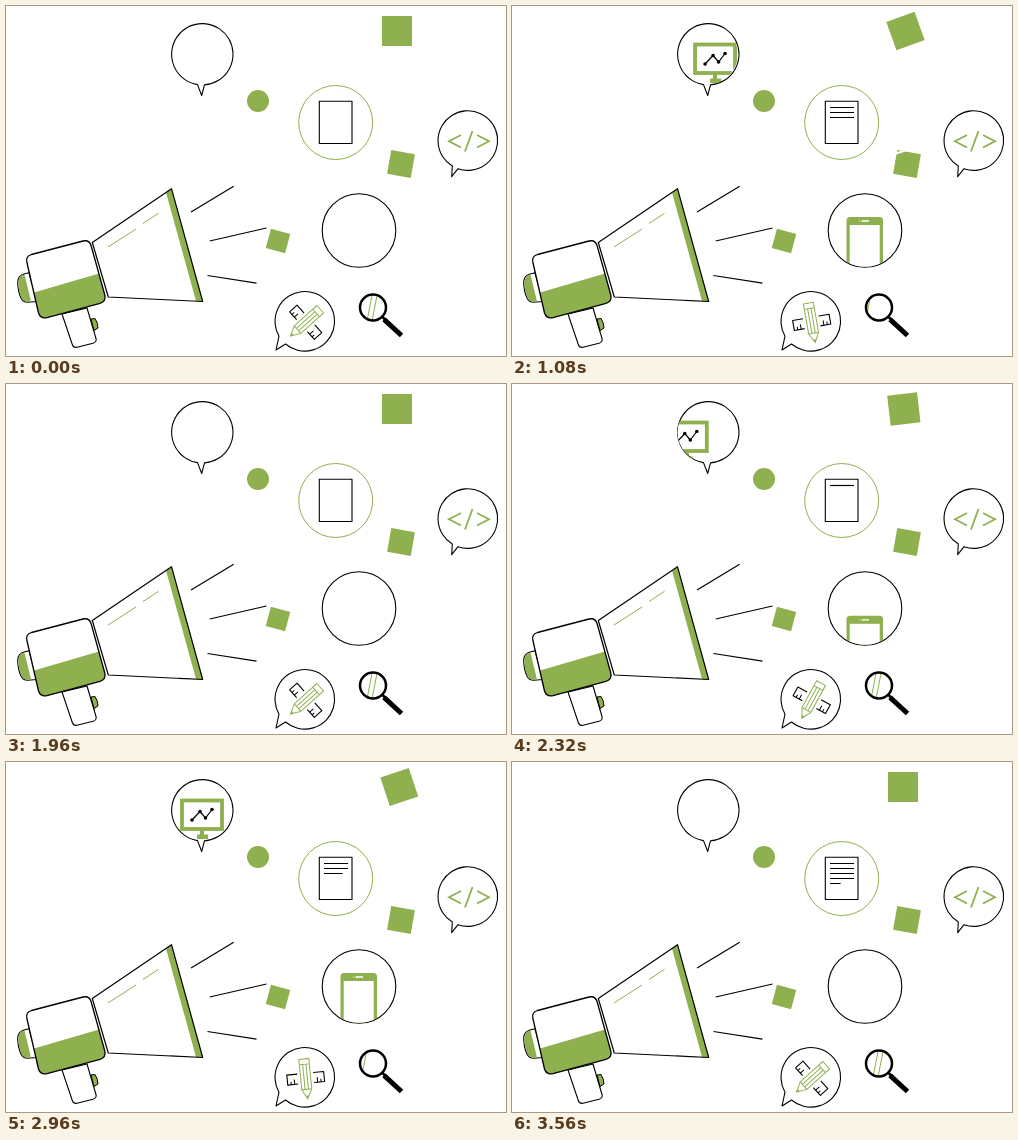
Animation, 500 px wide and 350 px high, one loop 4 s. Source, as an HTML page:

```html
<!DOCTYPE html>
<html lang="en">
<head>
<meta charset="utf-8">
<title>Megaphone and digital marketing icons</title>
<style>
  html, body { margin: 0; width: 100%; height: 100%; overflow: hidden; background: #fff; }
  svg { display: block; width: 500px; height: 350px; }
  .ink { fill: #fff; stroke: #000; stroke-width: 1.1; stroke-linejoin: round; }
  .line { fill: none; stroke: #000; stroke-width: 1.2; }
  .green { fill: #8fb04e; }
  .greenLine { fill: none; stroke: #8fb04e; stroke-width: 1; }
</style>
</head>
<body>
<svg viewBox="0 0 500 350">
  <defs>
    <clipPath id="screenClip"><circle cx="195.700" cy="48.300" r="30.200"/></clipPath>
    <clipPath id="phoneClip"><circle cx="353" cy="224.500" r="36.300"/></clipPath>
    <clipPath id="lensClip"><circle cx="367" cy="301.500" r="12"/></clipPath>
    <clipPath id="bodyClip"><path d="M28 286.500L93 267.500L110 300L30 320Z"/></clipPath>
    <path id="body" d="M25.500 248.500L77 235Q83.500 233.500 85.200 240L98.800 289Q100.200 295.500 94 297.300L41 311.700Q34.500 313 32.500 307L20.800 256Q19.500 250.500 25.500 248.500Z"/>
    <path id="horn" d="M86.300 236.500L165.500 182.700L196.700 295.500L102.300 291Z"/>
  </defs>

  <!-- megaphone -->
  <path class="ink" d="M23 266.800L18 268Q12 269.500 11.700 276Q11.700 285 15 292Q17 296.300 21.500 296.300L31 295.500Z"/>
  <path class="green" d="M18.500 268.500Q12.600 270 12.300 276Q12.300 285 15.500 291.700Q17.500 295.800 21.500 295.700L25 295.500Z"/>
  <path class="ink" d="M56 308L66.300 338.500Q67.500 342 71 341.300L87 337.300Q91 336 90 332.500L81 302Z"/>
  <path class="green" d="M85 313L89 312.500Q92 317 92 322L88 324.500Z" stroke="#000"/>
  <use href="#body" fill="#fff"/>
  <use href="#body" class="green" clip-path="url(#bodyClip)"/>
  <use href="#body" fill="none" stroke="#000" stroke-width="1.300"/>
  <use href="#horn" fill="#fff"/>
  <path class="green" d="M160 186.500L165.500 182.700L196.700 295.500L190 295Z"/>
  <use href="#horn" class="line" stroke-linejoin="round"/>
  <path class="greenLine" d="M102 241L130 223M137 217.500L152.500 207.300"/>
  <path class="line" d="M185 206L227.700 180.300M203.700 235L260.500 222M201.500 269.500L250.500 277.200"/>

  <!-- plain marks -->
  <circle class="green" cx="252" cy="95" r="11"/>
  <rect class="green" x="262" y="225" width="20" height="20" transform="rotate(15 272 235)"/>
  <rect class="green" x="383" y="146" width="24" height="24" transform="rotate(10 395 158)"/>
  <path id="glint" d="M-19 6L19 -6" stroke="#fff" stroke-width="2.200"/>
  <rect id="mark" class="green" x="-15" y="-15" width="30" height="30"/>

  <!-- monitor bubble -->
  <path class="ink" d="M191.500 78.600A30.700 30.700 0 1 1 198.500 78.900L195.700 89.500Z"/>
  <g clip-path="url(#screenClip)">
    <g id="screen">
      <rect x="176" y="38.500" width="40" height="28.500" fill="#fff" stroke="#8fb04e" stroke-width="3.800"/>
      <path class="green" d="M194 68h4v4.500h4v4.500h-11v-4.500h3z"/>
      <path class="line" d="M186 58L194 49.500L199.500 56L206 47.500"/>
      <path d="M186 58h0M194 49.500h0M199.500 56h0M206 47.500h0" stroke="#000" stroke-width="3.600" stroke-linecap="round"/>
    </g>
  </g>

  <!-- document -->
  <circle cx="329.700" cy="116.500" r="37" fill="#fff" stroke="#8fb04e"/>
  <rect class="ink" x="313.300" y="95.200" width="32.700" height="42.300"/>
  <path id="text" class="line"/>

  <!-- phone -->
  <circle class="ink" cx="353" cy="224.500" r="36.800"/>
  <g clip-path="url(#phoneClip)">
    <g id="phone">
      <rect class="green" x="334.500" y="211" width="36.500" height="72" rx="3.500"/>
      <rect x="337.700" y="219" width="30" height="55" fill="#fff"/>
      <path d="M349.500 215H357M347 215h.6" stroke="#fff" stroke-width="1.300"/>
    </g>
  </g>

  <!-- code bubble -->
  <path class="ink" d="M446.300 160A29.800 29.800 0 1 1 452 162.700L445.700 170.700Z"/>
  <path class="greenLine" style="stroke-width:1.800" d="M455 129L443 135.200L455 141.500M471 129L483 135.200L471 141.500M466.500 125L459 145.500"/>

  <!-- tools bubble -->
  <path class="ink" d="M273 330.200A29.800 29.800 0 1 1 279.500 338L270 344Z"/>
  <g id="tools">
    <path class="ink" d="M-8 -5H-18.500V5H-8M8 -5H18.500V5H8"/>
    <path class="line" style="stroke-width:1" d="M-15 5v-3M-11.500 5v-5M11.500 5v-5M15 5v-3"/>
    <path d="M-5 -19.500H5V11L0 20.500L-5 11Z" fill="#fff" stroke="#8fb04e"/>
    <path class="greenLine" d="M-5 -14H5M-1.700 -14V11M1.700 -14V11M-5 11H5"/>
    <path class="green" d="M-1.500 17.500H1.500L0 20.500Z"/>
  </g>

  <!-- magnifier -->
  <g clip-path="url(#lensClip)">
    <path id="shine" class="greenLine" d="M366.500 287L361 315M371.500 287L366 315"/>
  </g>
  <circle cx="367" cy="301.500" r="13" fill="none" stroke="#000" stroke-width="2.500"/>
  <path d="M376 310.500L380 314.500" stroke="#000" stroke-width="2.500"/>
  <path d="M378 313.300L395.500 329.500" stroke="#000" stroke-width="5"/>
</svg>
<script>
const LOOP = 4000, STEP = 40, RUN = 1600, FIRST = 360, SECOND = 1960;
const $ = id => document.getElementById(id);

// each track: [time, value] pairs, linear between them
const tracks = {
  screen: [[0, -53], [600, 0], [1000, 0], [RUN, 53]],
  phone: [[0, 52], [600, 0], [1240, 0], [1440, 52]],
  tools: [[0, 48], [1360, -25], [RUN, 48]],
  mark: [[0, 0], [1360, -25], [RUN, 0]],
  shine: [[0, 0], [720, -4], [1240, -16], [1360, -16], [RUN, 0]],
  glint: [[1000, 138], [RUN, 183]]
};

function at(track, p) {
  if (p <= track[0][0]) return track[0][1];
  for (let i = 1; i < track.length; i++) {
    const [t0, v0] = track[i - 1], [t1, v1] = track[i];
    if (p <= t1) return v0 + (v1 - v0) * (p - t0) / (t1 - t0);
  }
  return track[track.length - 1][1];
}

// the first run stands still, then joins its motion midway
function phase(t) {
  if (t < FIRST) return 0;
  return Math.min(t < SECOND ? t : t - SECOND, RUN);
}

function textPath(p) {
  let d = "";
  for (let i = 0; i < 5; i++) {
    const part = Math.min(1, p / 360 - i);
    if (part > 0) d += `M318 ${101.5 + 5 * i}h${24 * part}`;
  }
  return d;
}

const place = (id, value) => $(id).setAttribute("transform", value);

function draw() {
  const t = Math.floor(performance.now() % LOOP / STEP) * STEP;
  const p = phase(t);
  const v = name => at(tracks[name], p);
  place("screen", `translate(${v("screen")} 0)`);
  place("phone", `translate(0 ${v("phone")})`);
  place("tools", `translate(299.7 316.3) rotate(${v("tools")})`);
  place("mark", `translate(${391 - v("mark") / 8} 25) rotate(${v("mark")})`);
  place("shine", `translate(${v("shine")} 0)`);
  place("glint", `translate(395 ${v("glint")})`);
  $("glint").style.display = p > 1000 && p < RUN ? "" : "none";
  $("text").setAttribute("d", textPath(p));
  requestAnimationFrame(draw);
}
draw();
</script>
</body>
</html>
```
